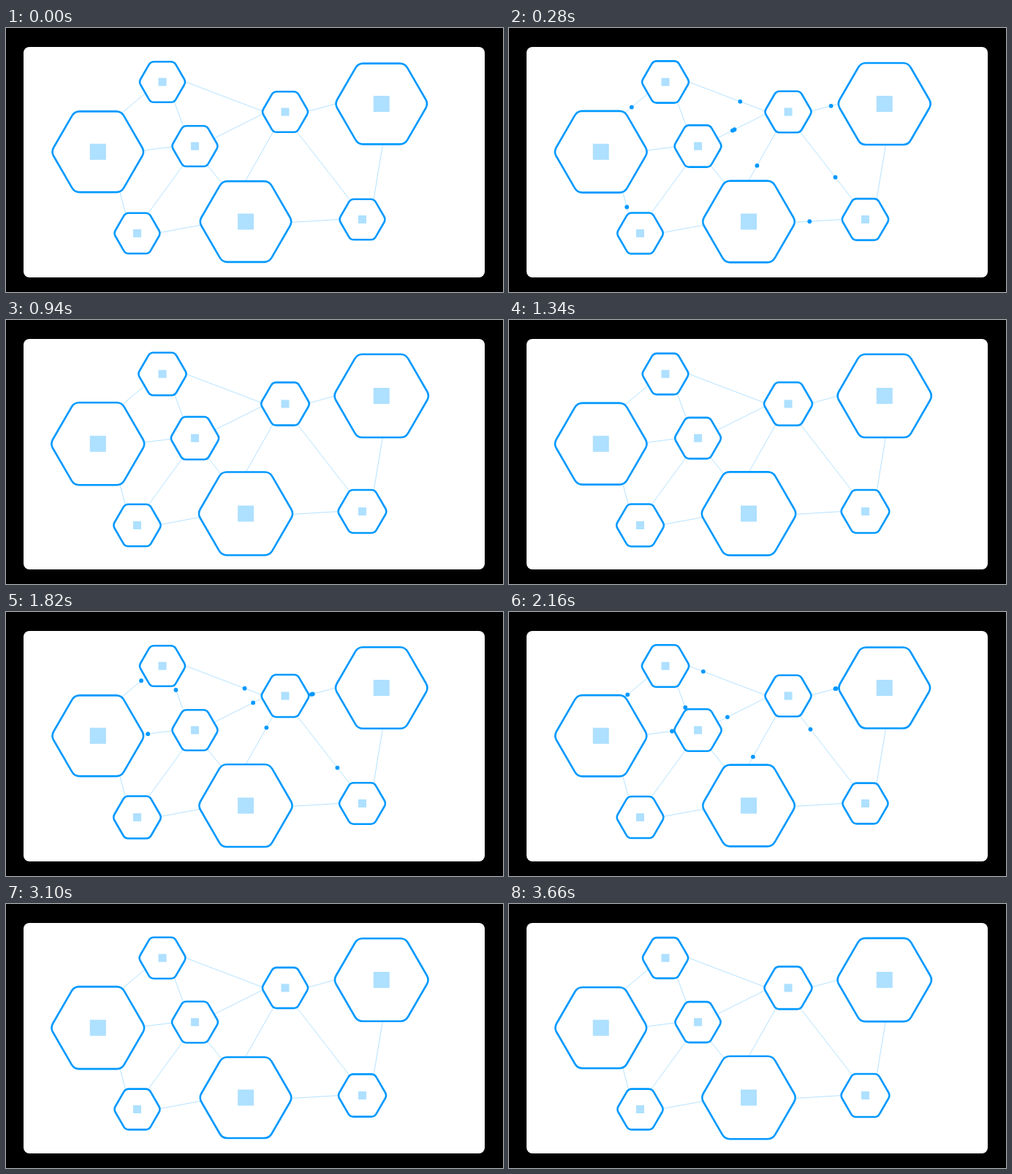
Recreate the animation shown at these times as an HTML page with a canvas. Size 680 by 362 pixels, loop 3.68 s.

```html
<!DOCTYPE html>
<html lang="en">
<head>
<meta charset="utf-8">
<title>Network</title>
<style>
  html, body { margin: 0; height: 100%; overflow: hidden; background: #000; }
  canvas { display: block; }
</style>
</head>
<body>
<canvas width="680" height="362"></canvas>
<script>
const ctx = document.querySelector('canvas').getContext('2d');
const LOOP = 3680, BLUE = '#0099ff', PALE = '#aee0ff';
const BIG = { apothem: 55.4, corner: 12, mark: 22 };
const SMALL = { apothem: 27.8, corner: 8, mark: 11 };

// x, y, size, pulse period (ms), pulse growth (px)
const nodes = [
  [125.75, 169.75, BIG, 2000, 1.2],
  [214, 74, SMALL, 1800, 1.7],
  [258.5, 162, SMALL, 1800, 1.7],
  [382, 115, SMALL, 3000, 2],
  [513.75, 104, BIG, 2500, 2],
  [179.5, 281.5, SMALL, 3500, 1.4],
  [328, 265.5, BIG, 3000, 2],
  [487.5, 262.5, SMALL, 2500, 2],
];

// Nodes are lettered A to H; each link runs between two node borders.
const links = {
  AB: [159, 116, 190, 90],
  BD: [246, 74, 351, 114],
  BC: [231, 103, 242, 133],
  AC: [188, 168, 227, 163],
  CD: [289, 149, 351, 118],
  DE: [414, 114, 451, 104],
  DG: [364, 145, 328, 209],
  DH: [399, 143.5, 470, 235],
  EH: [515.5, 160, 503, 235],
  GH: [391, 266.5, 456, 262.5],
  AF: [156, 226, 163, 252],
  CF: [241, 190, 196, 252],
  CG: [277, 190, 294, 211],
  FG: [211, 280.5, 265, 270.5],
};

// Each dot hops to a middle node, waits there, then hops on.
const routes = ['ABC', 'DBA', 'CDB', 'CDE', 'EDC', 'GDE', 'HDG', 'GHD', 'FAC'];
const HOP = 1240, SECOND_HOP = 1585, INSET = 10;

// The standard "ease" curve: cubic-bezier(.25, .1, .25, 1)
function ease(x) {
  if (x <= 0) return 0;
  if (x >= 1) return 1;
  const bezier = (s, a, b) => 3 * s * (1 - s) * ((1 - s) * a + s * b) + s ** 3;
  let low = 0, high = 1;
  for (let i = 0; i < 20; i++) {
    const mid = (low + high) / 2;
    if (bezier(mid, .25, .25) < x) low = mid; else high = mid;
  }
  return bezier(low, .1, 1);
}

function pulse(t, period) {
  const phase = t % period / period * 2;
  return phase < 1 ? ease(phase) : 1 - ease(phase - 1);
}

function pointOnLink(from, to, p) {
  const forward = links[from + to];
  const [x1, y1, x2, y2] = forward || links[to + from];
  if (!forward) p = 1 - p;
  const length = Math.hypot(x2 - x1, y2 - y1);
  const k = (p * (length + 2 * INSET) - INSET) / length;
  return [x1 + (x2 - x1) * k, y1 + (y2 - y1) * k];
}

function drawLinks() {
  ctx.strokeStyle = '#b5e3ff';
  ctx.lineWidth = 1;
  ctx.beginPath();
  for (const [from, to] of Object.keys(links)) {
    ctx.moveTo(...pointOnLink(from, to, 0));
    ctx.lineTo(...pointOnLink(from, to, 1));
  }
  ctx.stroke();
}

function drawDots(t) {
  ctx.fillStyle = BLUE;
  for (const route of routes) {
    const time = route === 'CDE' ? t - 18 : t;
    const [from, to] = time < SECOND_HOP ? route : route.slice(1);
    const p = ease((time < SECOND_HOP ? time : time - SECOND_HOP) / HOP);
    ctx.beginPath();
    ctx.arc(...pointOnLink(from, to, p), 2.9, 0, 7);
    ctx.fill();
  }
}

function drawNode(t, [x, y, size, period, growth]) {
  const radius = size.apothem / Math.cos(Math.PI / 6) + growth * pulse(t, period);
  const vertex = i => [
    x + radius * Math.cos(i * Math.PI / 3),
    y + radius * Math.sin(i * Math.PI / 3),
  ];
  ctx.beginPath();
  ctx.moveTo(x, y + radius * Math.cos(Math.PI / 6));
  for (let i = 2; i < 8; i++) ctx.arcTo(...vertex(i), ...vertex(i + 1), size.corner);
  ctx.closePath();
  ctx.fillStyle = '#fff';
  ctx.fill();
  ctx.strokeStyle = BLUE;
  ctx.lineWidth = 2.6;
  ctx.stroke();
  ctx.fillStyle = PALE;
  ctx.fillRect(x - size.mark / 2, y - size.mark / 2, size.mark, size.mark);
}

function draw() {
  const t = performance.now() % LOOP;
  ctx.fillStyle = '#000';
  ctx.fillRect(0, 0, 680, 362);
  ctx.fillStyle = '#fff';
  ctx.beginPath();
  ctx.roundRect(24, 26, 631, 316, 8);
  ctx.fill();
  drawLinks();
  drawDots(t);
  for (const node of nodes) drawNode(t, node);
  requestAnimationFrame(draw);
}
draw();
</script>
</body>
</html>
```
